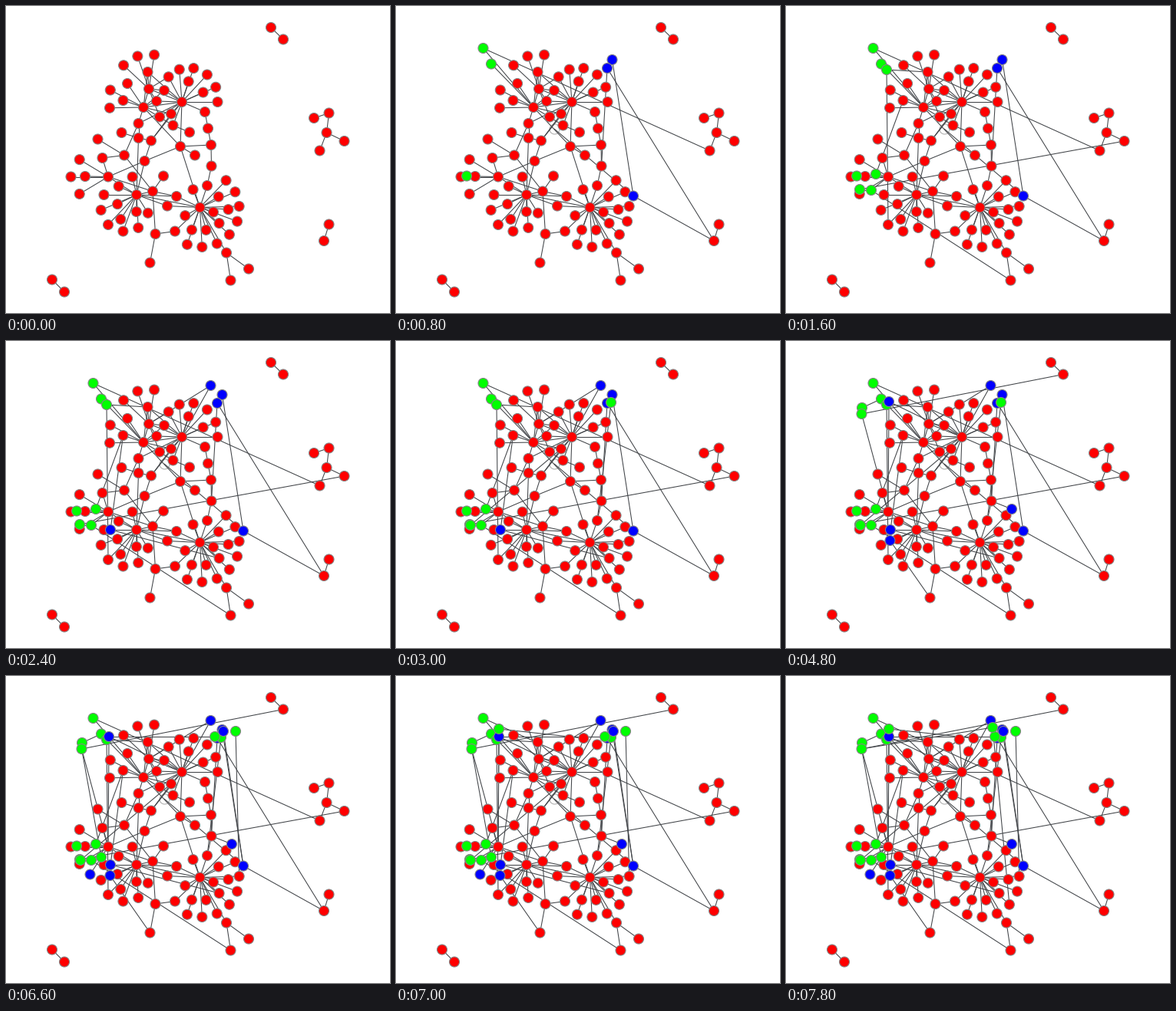
A matplotlib script that plays this animation: 500 by 400 pixels, repeating every 8000 ms.

```python
import math
import matplotlib.pyplot as plt
from matplotlib.animation import FuncAnimation
from matplotlib.collections import LineCollection

W, H, DPI = 500, 400, 100
STEP = 200
FRAMES = 40
PX = 72 / DPI
RED, GREEN, BLUE = "#ff0000", "#00ff00", "#0000ff"
LINE, RIM = "#414448", "#858585"


def arc(hub, n, a0, a1, r0, r1, bulge=0):
    """n points at even angles round a hub, the radius gliding from r0 to r1."""
    points = []
    for i in range(n):
        t = i / (n - 1)
        a = math.radians(a0 + (a1 - a0) * t)
        r = r0 + (r1 - r0) * t + bulge * math.sin(math.pi * t)
        points.append((hub[0] + r * math.cos(a), hub[1] + r * math.sin(a)))
    return points


def star(hub, ends):
    return [(hub, p) for p in ends]


def chain(*points):
    return list(zip(points, points[1:]))


# Hubs and the nodes that join them
A, B, C = (186, 108), (229, 125), (179, 132)
D, E, F = (133, 222.5), (170, 246), (252.5, 262.5)
MID, LOW, FORK, TAIL = (227, 183), (191, 241.5), (194.5, 297), (287, 321.5)
P, Q, R, S = (184.5, 86), (206, 110), (196, 124), (200, 144.5)
T, U, V = (215, 140.5), (217.5, 155.5), (172.5, 153)
W1, W2, J, K = (172.5, 172), (189, 175.5), (154, 194.5), (180.5, 202)
NEAR, SIDE, TWIG = (152.5, 123), (103, 222), (125.5, 198)
BEND, KNEE, NECK = (267, 181), (267.5, 208.5), (262, 234)
L1, L2, L3 = (222, 248), (210, 260.5), (220, 293.5)
FOOT, TIP = (187.5, 334.5), (292.5, 357.5)
FAR, EAST, SOUTH, WEST = (361, 43.5), (440.5, 176), (414, 306), (408.5, 188.5)
HEART, CORE = (417.5, 165), (206, 160)

# Leaves fanned round each hub
crown_a = arc(A, 3, -137, -81, 45, 45)
crown_b = arc(B, 6, -118, 0, 37, 46.5, 6)
inner_b = arc(B, 3, -72, 23.4, 28, 32.7)
crown_c = arc(C, 3, -124, -181, 37.4, 44, 8)
crown_d = arc(D, 3, 211, 149, 43.5, 43.5, 5)
crown_e = arc(E, 5, 180, 87, 42.5, 43, 11)
inner_e = arc(E, 3, 257, 154, 24, 27.7) + arc(E, 3, 123, 58, 38, 28, -11)
crown_f = arc(F, 8, -46, 109, 49, 51, 2)
inner_f = (arc(F, 4, 4, 110, 37, 31, -3) + arc(F, 2, -30, 19, 28, 18.5)
           + arc(F, 2, -111, 151, 25, 22))

base = (
    star(A, crown_a + [crown_b[0], P, Q, R, S, B, C])
    + star(B, crown_b + inner_b + [P, Q, R, S, T, U, V, W2, C, MID])
    + star(C, crown_c + [NEAR, P, Q, R, T, U, V, MID])
    + star(D, crown_d + [SIDE, TWIG, K, E, LOW])
    + star(E, crown_e + inner_e + [LOW, K, W1, L1, L2, F])
    + star(F, crown_f + inner_f + [NECK, L1, L2, L3, MID, TAIL])
    + star(HEART, [EAST, WEST])
    + chain(inner_b[2], (263, 159.5), BEND, KNEE, NECK)
    + chain(BEND, MID, (246, 194.5))
    + chain(U, (239, 164.5))
    + chain((150.5, 165), W1, W2, K, MID)
    + chain(W1, V, J, LOW, FORK, FOOT)
    + chain(T, W2)
    + chain((119.5, 173.5), J, TWIG)
    + chain((205, 221.5), LOW, L1)
    + chain(FORK, L3)
    + chain((316, 342.5), TAIL, TIP)
    + chain((345, 28), FAR)
    + chain((401, 146), (420.5, 139.5), HEART)
    + chain((420.5, 284.5), SOUTH)
    + chain((60, 356.5), (76, 372.5))
)
people = list(dict.fromkeys(p for edge in base for p in edge))

# Newcomers in order of arrival: colour, place, nodes they link to
G1, G2, G3, G4 = (113.5, 55), (124, 75.5), (131, 83), (98.5, 95)
B1, B2, B3 = (281.5, 70), (309, 247.5), (134, 79)
newcomers = [
    (GREEN, G1, [WEST, C]),
    (GREEN, (92, 221.5), [SIDE]),
    (GREEN, G2, [C]),
    (BLUE, B1, [B2]),
    (BLUE, B2, [SOUTH, CORE]),
    (BLUE, (275, 81), [SOUTH, KNEE]),
    (GREEN, G3, [P, crown_e[2]]),
    (GREEN, (117, 219), [NEAR, D]),
    (GREEN, (96, 239), [EAST]),
    (GREEN, (111, 240), [TIP, D]),
    (BLUE, (266.5, 58), [A, B]),
    (BLUE, (136, 246), [inner_f[1], NEAR]),
    (GREEN, (97, 240), [T]),
    (GREEN, (280, 80), [NECK]),
    (GREEN, (99, 87), [G2]),
    (BLUE, B3, [B, D]),
    (BLUE, (135.5, 260), [FOOT]),
    (BLUE, (294, 219), [KNEE]),
    (GREEN, G4, [FAR, D]),
    (GREEN, (272, 79), [B3]),
    (BLUE, (283, 72), [B2]),
    (GREEN, (299, 72), [crown_f[2]]),
    (GREEN, (124, 236), [G4]),
    (BLUE, (109.5, 258.5), [D]),
    (GREEN, (134, 69), [crown_b[2], D]),
    (GREEN, (269, 67), [G4, crown_f[4]]),
]


def arrival(i):
    """Step at which newcomer i joins; the gaps slowly grow."""
    return math.ceil(0.2 * (i + 1) ** 1.6)


fig = plt.figure(figsize=(W / DPI, H / DPI), dpi=DPI, facecolor="white")
ax = fig.add_axes([0, 0, 1, 1])
ax.set_xlim(0, W)
ax.set_ylim(H, 0)
ax.axis("off")


def dots(points, fill, rim, z):
    return ax.scatter(*zip(*points), s=(13 * PX) ** 2, c=fill, edgecolors=rim,
                      linewidths=1.1 * PX, zorder=z)


core = dots([CORE], "white", "#b0b0b0", 1)
edges = ax.add_collection(LineCollection(base, colors=LINE,
                                         linewidths=1.05 * PX, zorder=2))
nodes = dots(people, [RED] * len(people), RIM, 3)


def draw(n):
    here = [p for i, p in enumerate(newcomers) if arrival(i) <= n]
    edges.set_segments(base + [e for _, p, ends in here for e in star(p, ends)])
    nodes.set_offsets(people + [p for _, p, _ in here])
    nodes.set_facecolors([RED] * len(people) + [c for c, _, _ in here])
    core.set_visible(n > 0)
    return core, edges, nodes


anim = FuncAnimation(fig, draw, frames=FRAMES, interval=STEP,
                     init_func=lambda: draw(0), repeat=True, repeat_delay=0)
plt.show()
```
